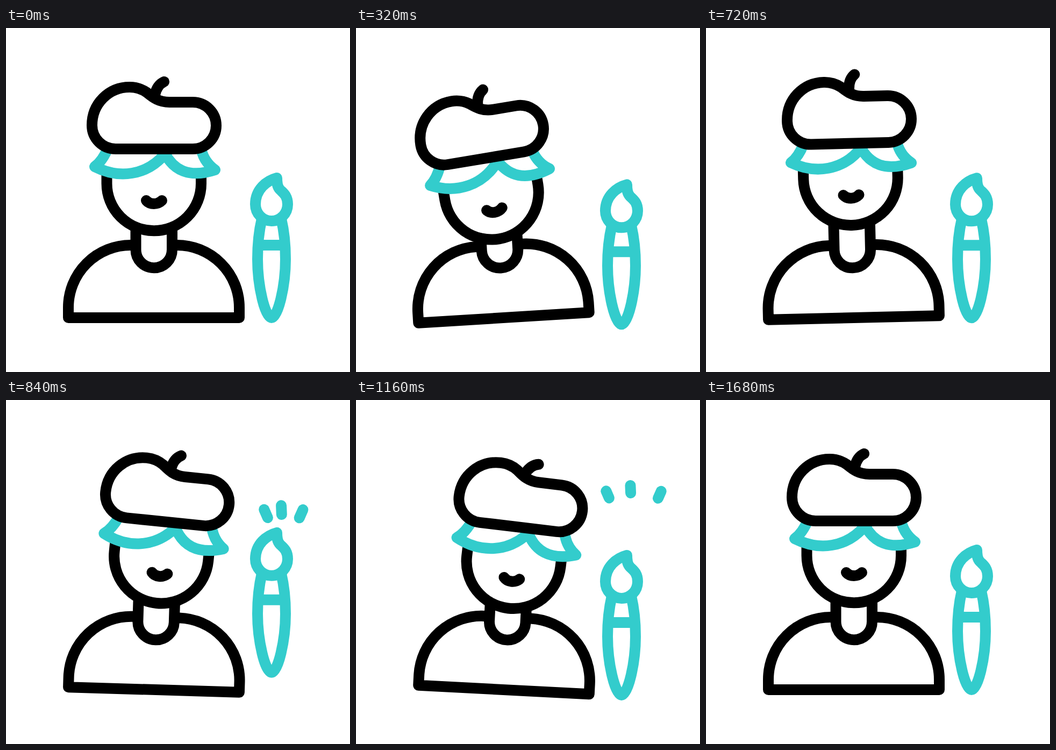
These frames come from a looping animation (640x640 px, 2 s). An HTML page:

```html
<!DOCTYPE html>
<html lang="en">
<head>
<meta charset="utf-8">
<title>Painter</title>
<style>
  html, body { margin: 0; width: 100%; height: 100%; overflow: hidden; background: #fff; }
  svg { display: block; width: 100%; height: 100%; }
  path, line { fill: none; stroke: #000; stroke-width: 20; stroke-linejoin: round; }
  .teal { stroke: #3cc; }
  .solid { fill: #fff; }
  .round { stroke-linecap: round; }
</style>
</head>
<body>
<svg viewBox="0 0 640 640">
  <g id="body">
    <path d="M236 404H232A116 116 0 0 0 116 520V539H434V520A116 116 0 0 0 318 404H314"/>
    <path d="M241.5 350V412.5A33.75 33.75 0 0 0 309 412.5V350"/>
    <g id="head">
      <path class="solid" d="M187.5 268V289.5A87.75 87.75 0 0 0 363 289.5V268"/>
      <path class="round" d="M261 321C268 329 282 329 290 321"/>
      <path class="teal solid" d="M189 225Q179 248 165 258C210 281 262 275 296 234C312 264 340 280 389 264C376 255 367 243 363 225"/>
      <path id="stem" class="round" d="M277 124Q281 106 294 100"/>
      <path class="solid" d="M204 225H347.5A43.5 43.5 0 0 0 347.5 138H304C283 138 272 128 262 120C252 113 242 110 230 110C191 110 160 141 160 181A44 44 0 0 0 204 225Z"/>
    </g>
  </g>
  <g id="brush">
    <path class="teal" d="M476 355C471 376 468 402 468 430C468 480 482 539 494 539C506 539 520 480 520 430C520 402 517 376 512 355M470 404H518"/>
    <path class="teal solid" d="M504 279C485 284 464 300 464 328A30 31 0 0 0 524 328C524 312 516 307 510 301C504 295 504 287 504 279Z"/>
  </g>
  <g id="sparks">
    <line class="teal round" x1="516" x2="516" transform="rotate(-23.5 516 286)"/>
    <line class="teal round" x1="516" x2="516" transform="rotate(-2.5 516 286)"/>
    <line class="teal round" x1="516" x2="516" transform="rotate(24 516 286)"/>
  </g>
</svg>
<script>
  const LOOP = 2000, STEP = 40, TICK = 1000 / 60;
  const $ = id => document.getElementById(id);
  const body = $('body'), head = $('head'), stem = $('stem'), brush = $('brush'), sparks = $('sparks');

  // progress of k from a to b, 0 to 1
  const ramp = (k, a, b) => Math.min(1, Math.max(0, (k - a) / (b - a)));
  const smooth = p => p * p * (3 - 2 * p);

  // Leaves rest at `from`, eases through evenly spaced peaks, rests again at `to`.
  const swing = ({ from = 0, first, gap, to, peaks }) => k => {
    let value = 0, start = from;
    [...peaks, 0].forEach((goal, i) => {
      const end = i < peaks.length ? first + gap * i : to;
      value += (goal - (peaks[i - 1] || 0)) * smooth(ramp(k, start, end));
      start = end;
    });
    return value;
  };

  const lean = swing({ first: 30, gap: 30, to: 90, peaks: [-5, 3.9] });
  const nod = swing({ first: 27, gap: 30, to: 90, peaks: [-7.5, 5.7] });
  const bob = swing({ first: 20, gap: 20, to: 97, peaks: [15, -12, 12] });
  const flick = swing({ from: 10, first: 35, gap: 30, to: 100, peaks: [-20, 15] });
  const lift = swing({ from: 11.5, first: 32, gap: 22.5, to: 100, peaks: [39, -39, 26.5] });

  const move = (el, value) => el.setAttribute('transform', value);

  function drawSparks(k) {
    const front = ramp(k, 46, 80) ** 0.7, tail = smooth(ramp(k, 57, 80));
    sparks.style.display = front > tail ? '' : 'none';
    for (const line of sparks.children) {
      line.setAttribute('y1', 213 - 70 * tail);
      line.setAttribute('y2', 213 - 70 * front);
    }
  }

  function draw(ms) {
    const k = Math.floor(ms / STEP) * STEP / TICK;
    move(body, `rotate(${lean(k)} 275 539)`);
    move(head, `translate(0 ${bob(k)}) rotate(${nod(k)} 275 375)`);
    move(stem, `rotate(${flick(k)} 278 126)`);
    move(brush, `translate(0 ${lift(k)})`);
    drawSparks(k);
  }

  const start = performance.now();
  function frame() {
    draw((performance.now() - start) % LOOP);
    requestAnimationFrame(frame);
  }
  frame();
</script>
</body>
</html>
```
